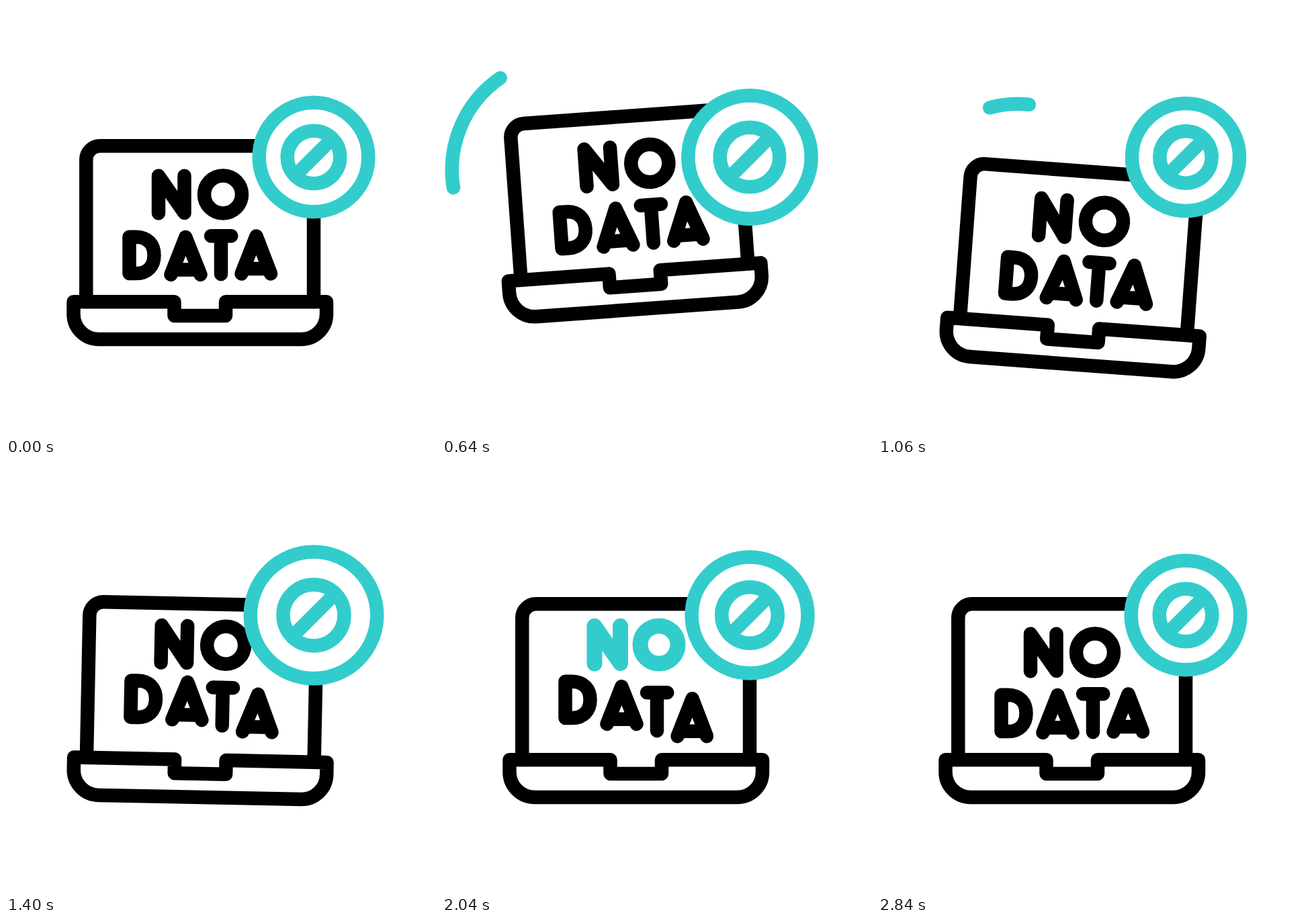
Recreate the animation shown at these times as an HTML page. Size 640 px wide and 640 px high, loop 3600 ms.

```html
<!DOCTYPE html>
<html lang="en">
<head>
<meta charset="utf-8">
<title>No data</title>
<style>
  html, body { margin: 0; width: 100%; height: 100%; overflow: hidden; background: #fff; }
  svg { display: block; width: 100vw; height: 100vh; }
  path, circle { fill: none; stroke: #000; stroke-width: 20.5; stroke-linecap: round; stroke-linejoin: round; }
  .teal path, .teal circle, #trail { stroke: #33cccc; }
  #no.lit path, #no.lit circle { stroke: #33cccc; stroke-width: 23; }
  #outer { fill: #fff; }
</style>
</head>
<body>
<svg viewBox="0 0 640 640" role="img" aria-label="NO DATA">
  <g id="laptop">
    <path id="trail" pathLength="100" d="M28.800 296A166 166 0 0 1 198.500 115.200"/>
    <path d="M119.300 440V228.700a20.500 20.500 0 0 1 20.500-20.500H437.500a20.500 20.500 0 0 1 20.500 20.500V440"/>
    <path d="M100.500 440.300H250.500V461H327V440.300H477V458.500a37.500 37.500 0 0 1-37.500 37.500H138a37.500 37.500 0 0 1-37.500-37.500Z"/>
    <g id="no">
      <path d="M227 308.500V252.800L265.500 308V252.800"/>
      <circle cx="323" cy="280.500" r="28"/>
    </g>
    <path class="letter" d="M183.500 343.700h10c17 0 27 11 27 27.200s-10 27.200-27 27.200h-10z"/>
    <path class="letter" d="M245.500 399.800L267.300 344L289.500 399.800M251 392.500H284"/>
    <path class="letter" d="M305 342.300H335.300M320 342.300V399"/>
    <path class="letter" d="M350.500 398.500L372.500 342.500L394 398.500M356 391H389"/>
  </g>
  <g class="teal">
    <circle id="outer" cx="458" cy="225" r="81.300"/>
    <circle id="inner" cx="458" cy="225" r="39.300"/>
    <path id="slash"/>
  </g>
</svg>
<script>
const LOOP = 3600, START = 220, PULSE = 2620 / 3, STAGGER = 80;
const $ = id => document.getElementById(id);
const letters = [...document.querySelectorAll('.letter')];

// Rows of [time, value], joined by a sine ease.
const lift = [[220, 0], [600, -50], [880, 56], [1340, 0]];
const tilt = [[330, 0], [760, -5], [1140, 5.3], [1520, 0]];
const wave = [[1120, 0], [1360, -20], [1740, 9], [2080, -21], [2460, 0]];
const rise = [[1160, 0], [1380, -11.5], [2560, -11.5], [2820, 0]];
const head = [[220, 0], [910, 100]];
const tail = [[630, 0], [1250, 100]];

function at(keys, t) {
  if (t <= keys[0][0]) return keys[0][1];
  for (let i = 1; i < keys.length; i++) {
    const [t0, a] = keys[i - 1], [t1, b] = keys[i];
    if (t < t1) return a + (b - a) * (1 - Math.cos(Math.PI * (t - t0) / (t1 - t0))) / 2;
  }
  return keys[keys.length - 1][1];
}

function pulse(t) {
  if (t < START || t >= START + 3 * PULSE) return 0;
  const p = (t - START) / PULSE % 1, top = 0.33;
  return p < top ? 13 * Math.sin(Math.PI / 2 * p / top)
    : at([[top, 13], [0.91, -3.5], [1, 0]], p);
}

function trim(el, from, to) {
  el.style.visibility = to > from ? 'visible' : 'hidden';
  el.style.strokeDasharray = `${to - from} 300`;
  el.style.strokeDashoffset = -from;
}

const shift = (el, y) => el.setAttribute('transform', `translate(0 ${y})`);

function draw(t) {
  $('laptop').setAttribute('transform',
    `translate(0 ${at(lift, t)}) rotate(${at(tilt, t)} 288.5 470)`);
  trim($('trail'), at(tail, t), at(head, t));
  shift($('no'), at(rise, t));
  $('no').classList.toggle('lit', t >= 1840 && t < 2240);
  letters.forEach((el, i) => shift(el, at(wave, t - i * STAGGER)));

  const grow = pulse(t), r = 39.3 + grow * 0.483, d = r * Math.SQRT1_2;
  $('outer').setAttribute('r', 81.3 + grow);
  $('inner').setAttribute('r', r);
  $('slash').setAttribute('d', `M${458 - d} ${225 + d}L${458 + d} ${225 - d}`);
}

const begin = performance.now();
function tick() {
  draw((performance.now() - begin) % LOOP);
  requestAnimationFrame(tick);
}
tick();
</script>
</body>
</html>
```
